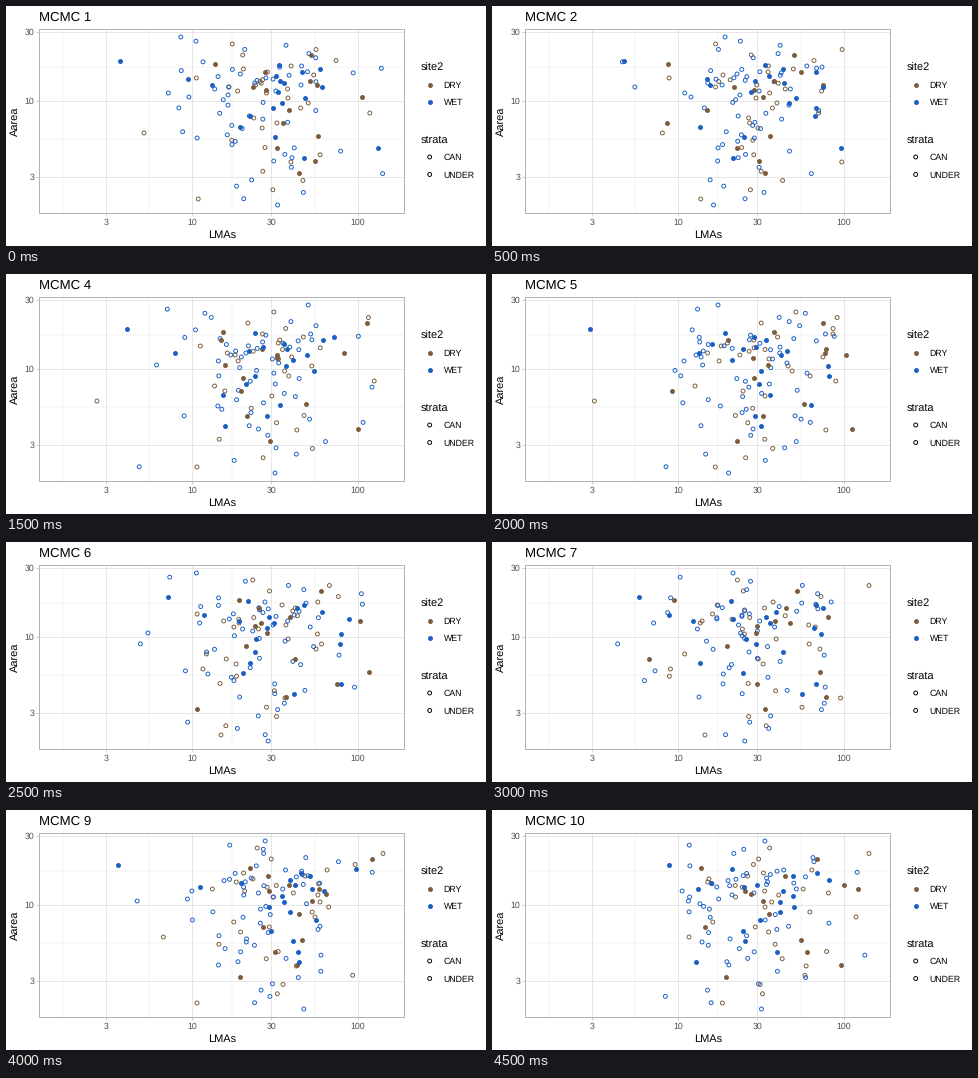
These frames come from a looping animation (480 by 240 pixels, 5000 ms). A matplotlib script:

```python
import numpy as np
import matplotlib.pyplot as plt
from matplotlib.animation import FuncAnimation
from matplotlib.patches import Rectangle

W, H, DPI = 480, 240, 100
PT = 72 / DPI                      # points per pixel
STEPS, STEP_MS = 10, 500
LEFT, RIGHT, TOP, BOTTOM = 33, 398, 23, 207
BROWN, BLUE, GRID, FRAME = "#7b5c3c", "#1a5fc4", "#dedede", "#b3b3b3"

plt.rcParams["font.family"] = "Liberation Sans"
plt.rcParams["text.hinting"] = "none"

fig = plt.figure(figsize=(W / DPI, H / DPI), dpi=DPI, facecolor="white")
ax = fig.add_axes([0, 0, 1, 1])
ax.set_xlim(0, W)
ax.set_ylim(H, 0)
ax.axis("off")


def line(x0, y0, x1, y1, color, width):
    ax.plot([x0, x1], [y0, y1], color=color, lw=width * PT,
            solid_capstyle="butt", zorder=1)


def label(x, y, text, size, color="black", ha="left", va="baseline", **kw):
    return ax.text(x, y, text, fontsize=size * PT, color=color,
                   ha=ha, va=va, **kw)


def dots(x, y, color, filled):
    return ax.scatter(x, y, s=(3.9 * PT) ** 2,
                      facecolors=color if filled else "none",
                      edgecolors=color, linewidths=0.95 * PT, zorder=3)


def x_px(value):
    return 186.4 + 165.7 * np.log10(value / 10)


def y_px(value):
    return 95.2 - 145 * np.log10(value / 10)


def draw_panel():
    x_ticks, y_ticks = (3, 10, 30, 100), (3, 10, 30)
    for x in (56.5, 143, 226, 309):
        line(x, TOP, x, BOTTOM, GRID, 0.35)
    for y in (60.6, 133):
        line(LEFT, y, RIGHT, y, GRID, 0.35)
    for v in x_ticks:
        x = x_px(v)
        line(x, TOP, x, BOTTOM, GRID, 0.7)
        line(x, BOTTOM, x, BOTTOM + 3, FRAME, 0.6)
        label(x, 219.3, str(v), 8.8, "#4d4d4d", ha="center")
    for v in y_ticks:
        y = y_px(v)
        line(LEFT, y, RIGHT, y, GRID, 0.7)
        line(LEFT - 3, y, LEFT, y, FRAME, 0.6)
        label(28.5, y + 3.2, str(v), 8.8, "#4d4d4d", ha="right")
    ax.add_patch(Rectangle((LEFT, TOP), RIGHT - LEFT, BOTTOM - TOP,
                           fill=False, ec=FRAME, lw=PT, zorder=4))
    label(216, 232.3, "LMAs", 11, ha="center")
    label(14, 115.5, "Aarea", 11, ha="right", va="center", rotation=90)


def draw_legend():
    label(414.7, 64.5, "site2", 11)
    label(414.7, 136.7, "strata", 11)
    rows = [(78.5, "DRY", BROWN, True), (96, "WET", BLUE, True),
            (151, "CAN", "black", False), (168.5, "UNDER", "black", False)]
    for y, text, color, filled in rows:
        dots(423.7, y, color, filled)
        label(437.5, y + 3.2, text, 8.8)


def make_group(count, knots, center, color, filled):
    """Fixed heights along a quantile curve, left-skewed mean positions."""
    pos = np.linspace(0, 1, count)
    y = np.interp(pos, np.linspace(0, 1, len(knots)), knots)
    mean_x = center + 20 - setup.gumbel(0, 34, count)
    return mean_x, y, dots(mean_x, y, color, filled)


draw_panel()
draw_legend()
title = label(33, 15.3, "MCMC 1", 13.2)
setup = np.random.default_rng(8)
groups = [
    make_group(33, (38, 60, 72, 79, 87, 107, 127, 156, 193), 272, BROWN, False),
    make_group(57, (31, 60, 68, 77, 91, 110, 132, 155, 199), 256, BLUE, False),
    make_group(14, (49, 77, 85, 127, 167), 268, BROWN, True),
    make_group(19, (55, 72, 81, 105, 152), 262, BLUE, True)]


def update(step):
    rng = np.random.default_rng(40 + step)
    title.set_text(f"MCMC {step + 1}")
    for mean_x, y, artist in groups:
        x = np.clip(mean_x + rng.normal(0, 30, len(y)), 50, 377)
        artist.set_offsets(np.column_stack([x, y]))
    return [title] + [artist for _, _, artist in groups]


anim = FuncAnimation(fig, update, frames=STEPS, interval=STEP_MS,
                     init_func=lambda: update(0), repeat=True,
                     repeat_delay=0, blit=False)
plt.show()
```
